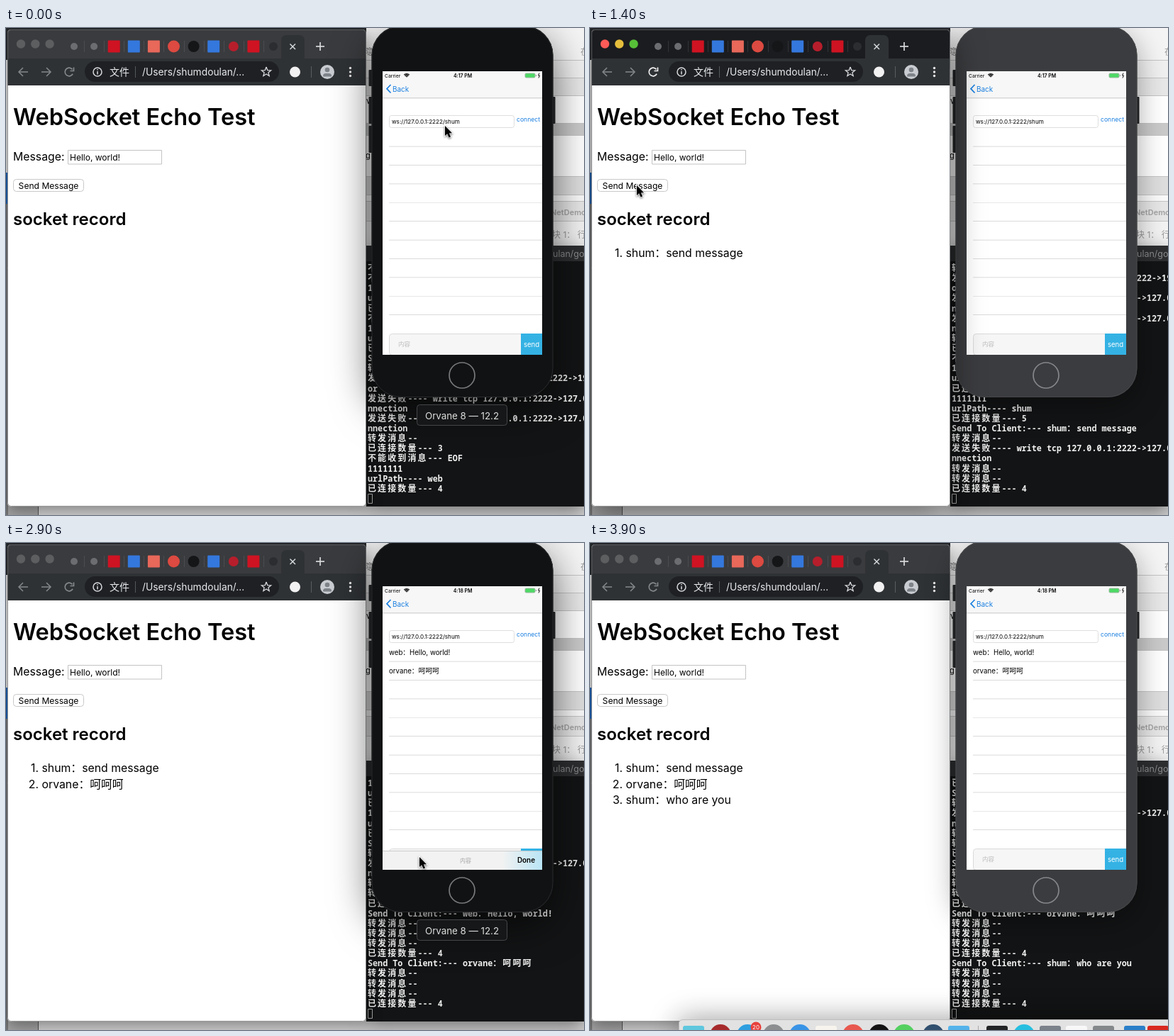
Animation, 815 px wide and 687 px high, one loop 4000 ms. Source, as an HTML page with a canvas:

```html
<!DOCTYPE html>
<html lang="zh-CN">
<head>
<meta charset="utf-8">
<title>WebSocket Echo Test</title>
<style>
html, body { margin: 0; width: 100%; height: 100%; overflow: hidden; background: #d4d4d4; }
canvas { display: block; }
</style>
</head>
<body>
<canvas id="stage" width="815" height="687"></canvas>
<script>
const g = document.getElementById('stage').getContext('2d');
const SANS = 'Inter, "Noto Sans CJK SC", "Noto Sans CJK", sans-serif';
const MONO = '"Noto Sans Mono", "DejaVu Sans Mono", "Noto Sans CJK SC", "Noto Sans CJK", monospace';
const LOOP = 4000, STEP = 100, BLUE = '#1a7fe0';

// ---- drawing helpers ----
function rect(x, y, w, h, fill, radius = 0, stroke) {
  g.beginPath();
  g.roundRect(x, y, w, h, radius);
  if (fill) { g.fillStyle = fill; g.fill(); }
  if (stroke) { g.strokeStyle = stroke; g.lineWidth = 1; g.stroke(); }
}
function disc(x, y, r, fill) {
  g.beginPath();
  g.arc(x, y, r, 0, 7);
  g.fillStyle = fill;
  g.fill();
}
function path(points, color, width = 1.5) {
  g.beginPath();
  points.forEach(([x, y]) => g.lineTo(x, y));
  g.strokeStyle = color;
  g.lineWidth = width;
  g.stroke();
}
function arc(x, y, r, from, to, color, width = 1.5) {
  g.beginPath();
  g.arc(x, y, r, from, to);
  g.strokeStyle = color;
  g.lineWidth = width;
  g.stroke();
}
function text(s, x, y, size, color = '#000', weight = 400, align = 'left', family = SANS) {
  g.font = `${weight} ${size}px ${family}`;
  g.fillStyle = color;
  g.textAlign = align;
  g.fillText(s, x, y);
}
function shadowed(blur, dy, alpha, draw) {
  g.save();
  g.shadowBlur = blur;
  g.shadowOffsetY = dy;
  g.shadowColor = `rgba(0,0,0,${alpha})`;
  draw();
  g.restore();
}
function clipped(x, y, w, h, draw) {
  g.save();
  g.beginPath();
  g.rect(x, y, w, h);
  g.clip();
  draw();
  g.restore();
}

// ---- timeline: keys are [time, ...values], linear in between ----
function track(keys, t) {
  const i = keys.findIndex(k => k[0] > t);
  if (i < 0) return keys.at(-1).slice(1);
  if (i === 0) return keys[0].slice(1);
  const a = keys[i - 1], b = keys[i], p = (t - a[0]) / (b[0] - a[0]);
  return a.slice(1).map((v, n) => v + (b[n + 1] - v) * p);
}
const CURSOR = [[0, 619, 138], [300, 737, 124], [400, 737, 124], [600, 600, 438], [700, 600, 438],
  [800, 580, 378], [900, 580, 378], [1000, 742, 402], [1100, 742, 410], [1300, 93, 202],
  [1400, 66, 222], [1500, 66, 224], [2100, 66, 224], [2500, 560, 440], [2700, 583, 443],
  [3000, 583, 443], [3200, 745, 405], [3300, 750, 425], [3400, 750, 425], [3700, 640, 690]];
const LIFT = [[800, 0], [900, 36], [1000, 36], [1100, 2], [1200, 0], [2900, 0], [3000, 36], [3200, 36], [3300, 2], [3400, 0]];
const BAR = [[700, 0], [800, 26.5], [1000, 26.5], [1100, 2], [1200, 0], [2800, 0], [2900, 26.5], [3200, 26.5], [3300, 2], [3400, 0]];
const DOCK = [[3600, 687], [3900, 672]];

const RECORDS = [[1100, 'shum：send message'], [2500, 'orvane：呵呵呵'], [3300, 'shum：who are you']];
const ROWS = [[2000, 'web：Hello, world!'], [2500, 'orvane：呵呵呵']];
const DRAFTS = [[900, 1000, 'send message'], [3000, 3200, 'who are you']];

// ---- terminal log ----
const count = n => '已连接数量--- ' + n;
const join = (who, n) => ['1111111', 'urlPath---- ' + who, count(n)];
const relay = '转发消息--', eof = '不能收到消息--- EOF';
const failed = (ip = '127.0.0.1', rest = 'nnection') => [`发送失败---- write tcp ${ip}:2222->${ip}`, rest];
const sent = s => ['Send To Client:--- ' + s, relay, relay, relay, count(4)];
const LOG = [
  [0, [eof, eof, ...join('web', 3), eof, ...join('web', 4), 'Send To Client:--- web', relay,
    ...failed('192.168.1.19', 'or'), ...failed(), ...failed(), relay, count(3), eof, ...join('web', 4)]],
  [400, join('shum', 5)],
  [1100, ['Send To Client:--- shum：send message', relay, ...failed(), relay, relay, count(4)]],
  [2000, sent('web：Hello, world!')],
  [2500, sent('orvane：呵呵呵')],
  [3300, sent('shum：who are you')]
];
function terminalLine(s, y) {
  let x = 510;
  for (const ch of s) {
    const wide = ch > '\u2fff';
    text(ch, x, y, wide ? 12 : 11.7, '#f2f2f2', 600, 'left', MONO);
    x += wide ? 14.1 : 7.05;
  }
}
function terminal(t) {
  shadowed(24, 8, .45, () => rect(508, 307, 307, 368, '#131415'));
  rect(508, 307, 307, 22, '#2c2e30');
  text('ulan/go', 771, 323, 12.5, '#898b8c');
  clipped(508, 329, 307, 346, () => {
    const lines = LOG.filter(e => e[0] <= t).flatMap(e => e[1]).slice(-23);
    lines.forEach((s, i) => terminalLine(s, 343 + i * 14.13));
  });
  rect(510.5, 657.5, 6, 13, null, 0, '#a5a5a5');
}

function desktop() {
  rect(0, 0, 815, 687, '#d6d6d6');
  rect(0, 0, 508, 45, '#25282b');
  rect(0, 45, 3, 159, '#e4e4e4');
  rect(0, 204, 3, 44, '#1e62b5');
  rect(0, 248, 3, 439, '#777');
  rect(3, 672, 43, 15, '#a5a5a5');
  rect(45, 675, 1, 12, '#555');
  rect(508, 0, 307, 307, '#f4f4f4');
  for (const [y, h, color] of [[45, 25, '#f0f0f0'], [70, 25, '#e8e8e8'], [95, 39, '#fff'], [134, 17, '#cacaca'],
    [151, 58, '#fff'], [209, 26, '#dedede'], [235, 9, '#fafafa'], [244, 28, '#e7e7e7'], [272, 35, '#f3f3f3']]) {
    rect(508, y, 307, h, color);
    rect(508, y, 307, 1, '#c4c4c4');
  }
  text('在', 810, 38, 12, '#999');
  text('隐', 506, 38, 12, '#777');
  text('v', 508, 107, 11);
  text('g', 507, 184, 11);
  text('NetDemo', 768, 264, 11, '#a2a2a2', 600);
  text('块 1： 行', 770, 296, 12, '#999');
}

// ---- browser ----
function favicons() {
  const icons = [['#6b6d70', 5, 1], ['#6b6d70', 5, 1], ['#cf1322', 8.5], ['#3478dd', 8.5], ['#e8685a', 8.5],
    ['#dc4a41', 8.5, 1], ['#141618', 8, 1], ['#3478dd', 8.5], ['#b71e2c', 7, 1], ['#cf1322', 8.5], ['#2b2d30', 6, 1]];
  icons.forEach(([color, r, round], i) => {
    const x = 96 + i * 28.1;
    if (round) disc(x, 26, r, color);
    else rect(x - r, 26 - r, 2 * r, 2 * r, color, 1);
    if (i < 10) rect(Math.round(x + 14), 18, 1, 16, 'rgba(140,145,150,.2)');
  });
}
function browser(t, active) {
  shadowed(active ? 46 : 22, active ? 12 : 6, active ? .55 : .4, () => rect(2, 2, 505.5, 673, '#fff', 5));
  rect(2, 2, 505.5, 60, active ? '#1b1c1f' : '#3a3b3e', 5);
  rect(388, 10, 33, 40, '#2f3235', [7, 7, 0, 0]);
  rect(2, 43, 505.5, 38, '#2f3235');
  ['#fc5b57', '#e5bf3c', '#57c038'].forEach((c, i) => disc(21 + 20.3 * i, 22.5, 6.2, active ? c : '#5c5e60'));
  favicons();
  const light = '#d7d9db', dim = '#85888b';
  path([[400.5, 22.5], [408, 30]], light);
  path([[408, 22.5], [400.5, 30]], light);
  path([[437, 26], [449, 26]], light, 1.7);
  path([[443, 20], [443, 32]], light, 1.7);

  path([[31, 62], [18, 62]], dim);
  path([[24, 56], [18, 62], [24, 68]], dim);
  path([[50, 62], [63, 62]], dim);
  path([[57, 56], [63, 62], [57, 68]], dim);
  const reload = active ? '#f0f0f0' : dim;
  arc(89, 62, 5.8, .5, 5.6, reload, 1.7);
  path([[95.5, 55.5], [95.5, 60.5], [90.5, 60.5]], reload, 1.7);
  rect(111, 47, 274, 29, '#1e2023', 14.5);
  arc(129, 62, 6, 0, 7, light);
  path([[129, 61], [129, 65.5]], light);
  path([[129, 58], [129, 59.6]], light);
  text('文件', 146, 67, 14, '#e8eaec');
  rect(182, 54, 1, 16, '#55585b');
  text('/Users/shumdoulan/...', 192, 67, 13.8, '#e8eaec');
  const star = Array.from({ length: 11 }, (_, i) => {
    const r = i % 2 ? 3 : 7, a = i * Math.PI / 5 - Math.PI / 2;
    return [367 + r * Math.cos(a), 62 + r * Math.sin(a)];
  });
  path(star, light, 1.3);
  disc(407.5, 62, 7.5, '#f2f2f2');
  rect(430, 54, 1, 16, '#5a5d60');
  disc(453, 62, 10, '#c9ccd1');
  disc(453, 59, 3.3, '#7e838a');
  rect(447, 64, 12, 4.5, '#7e838a', [5, 5, 1, 1]);
  [56.5, 62, 67.5].forEach(y => disc(485.5, y, 1.7, '#e6e6e6'));

  text('WebSocket Echo Test', 10, 136.5, 32.5, '#000', 600);
  text('Message:', 10, 187, 15.8);
  rect(87.5, 172.5, 132, 19.5, '#fff', 0, '#c3c3c3');
  text('Hello, world!', 90, 187, 12);
  rect(10.5, 213.5, 99, 17, '#fff', 4, '#c8c8c8');
  text('Send Message', 60, 226.5, 12.1, '#000', 400, 'center');
  text('socket record', 10, 278, 24, '#000', 600);
  RECORDS.forEach(([at, s], i) => {
    if (t < at) return;
    const y = 323.3 + i * 22.3;
    text(i + 1 + '.', 46, y, 15.8, '#000', 400, 'right');
    text(s, 50.5, y, 15.8);
  });
  rect(2.5, 2.5, 505, 672, null, 5, 'rgba(110,112,114,.7)');
}

// ---- phone ----
function statusBar(t) {
  rect(531, 61, 225, 38, '#f7f7f7');
  rect(531, 98.5, 225, .8, '#b8b8b8');
  text('Carrier', 534, 69.5, 6.8);
  for (const r of [1.6, 3.6, 5.4]) arc(565, 70, r, -2.35, -.8, '#000', 1.3);
  text(t < 2400 ? '4:17 PM' : '4:18 PM', 644, 69.5, 6.9, '#000', 600, 'center');
  rect(732, 64, 14, 6, '#4cd964', 1.5, '#9fb5a2');
  rect(747, 66, 1, 2, '#999');
  path([[752, 63.5], [750.5, 67], [752.5, 67], [751, 70.5]], '#000', .9);
  path([[542.5, 80], [537, 85.7], [542.5, 91.5]], BLUE, 1.7);
  text('Back', 545, 89.7, 9.9, BLUE);
}
function screenContent(t) {
  const [lift] = track(LIFT, t), [bar] = track(BAR, t);
  g.save();
  g.translate(0, -lift);
  rect(540.5, 123.5, 176, 17, '#fff', 3, '#dedede');
  text('ws://127.0.0.1:2222/shum', 544, 134.8, 8.1);
  text('connect', 720, 132, 8.6, BLUE);
  for (let i = 0; i < 10; i++) rect(540, 166.7 + i * 26.4, 216, .7, '#cfcfcf');
  ROWS.forEach(([at, s], i) => { if (t >= at) text(s, 540, 157.5 + i * 26.4, 9.7); });
  rect(540.5, 431.5, 190, 30, '#f6f6f6', 4, '#dadada');
  rect(726, 431, 30, 30, '#34b2e4');
  text('send', 741, 449.5, 9.6, '#fff', 400, 'center');
  const draft = DRAFTS.find(([from, to]) => t >= from && t < to + STEP);
  if (draft) {
    const [from, to, s] = draft;
    text(s.slice(0, Math.ceil(s.length * (t - from + STEP) / (to - from + STEP))), 553, 449, 8.6);
  } else text('内容', 553, 449, 8.5, '#bcbcbc');
  g.restore();

  if (bar > 0) {
    const y = 460.5 - bar, tint = g.createLinearGradient(700, 0, 756, 0);
    tint.addColorStop(0, '#f2f2f2');
    tint.addColorStop(1, '#b9e4f5');
    rect(531, y, 225, 28, tint);
    rect(531, y, 225, .8, '#bdbdbd');
    text('内容', 648, y + 17, 8, '#a5a5a5', 400, 'center');
    text('Done', 746, y + 17, 9.9, '#000', 600, 'right');
  }
  if ((t >= 1100 && t < 1200) || (t >= 3300 && t < 3500)) {
    rect(617.5, 249, 51.5, 23.5, '#25282a', 5);
    text('发送成功', 643.2, 264.2, 9.7, '#fff', 400, 'center');
  }
}
function phone(t, active, labelled) {
  const body = active ? '#111213' : '#3b3c3f';
  for (const [x, y, h] of [[511.5, 59, 23], [511.5, 97, 38], [511.5, 138, 38], [769, 97, 38]]) rect(x, y, 5.5, h, '#242628', 1);
  shadowed(active ? 56 : 40, active ? 18 : 12, active ? .6 : .36, () => rect(515.5, -3, 256, 524, body, 41));
  rect(516, -2.5, 255, 523, null, 41, active ? '#2a2b2d' : '#47484a');
  arc(643, 490, 18, 0, 7, active ? '#77797b' : '#85878a', 1.7);
  rect(531, 61, 225, 400, '#fff');
  clipped(531, 99, 225, 362, () => screenContent(t));
  statusBar(t);
  if (labelled) {
    rect(579.5, 531.5, 127, 29, '#161718', 4, '#454648');
    text('Orvane 8 — 12.2', 643, 551.5, 13.3, '#dedede', 400, 'center');
  }
}

// ---- dock and pointer ----
function dock(top) {
  shadowed(40, 0, .4, () => rect(125.5, top + .5, 720, 40, '#e4e4e4', 5, '#bdbdbd'));
  const icons = [[146, '#5fc7de'], [184, '#a62a2c', 1], [222, '#2f9fe0', 1], [259, '#8c8e90', 1], [296, '#3a94e6', 1],
    [333, '#f7f4ee'], [371, '#e8584e', 1], [408, '#141414', 1], [443, '#53d060', 1], [484, '#32506f', 1],
    [520, '#55b3ea'], [574, '#222426'], [612, '#27bfe0', 1], [649, '#7b828a'], [686, '#f8f8f8'],
    [724, '#85888a'], [768, '#2a7fc9'], [801, '#d9281f']];
  for (const [x, color, round] of icons) {
    if (round) disc(x, top + 22, 15, color);
    else rect(x - 15, top + 9, 30, 30, color, 3);
  }
  rect(547, top + 9, 1, 20, '#aaa');
  disc(234, top + 11, 7.5, '#e8413c');
  text('20', 234, top + 14, 8, '#fff', 400, 'center');
}
function pointer(x, y) {
  g.save();
  g.translate(x, y);
  shadowed(3, 1, .4, () => {
    g.beginPath();
    for (const [px, py] of [[0, 0], [0, 14], [3.2, 11], [5.6, 16.4], [8, 15.4], [5.7, 10.2], [10, 10.2]]) g.lineTo(px, py);
    g.closePath();
    g.strokeStyle = '#fff';
    g.lineWidth = 2;
    g.stroke();
    g.fillStyle = '#000';
    g.fill();
  });
  g.restore();
}

function render(t) {
  const [x, y] = track(CURSOR, t);
  const browserActive = t >= 1400 && t < 2900;
  const phoneActive = !browserActive && t < 3800;
  const hovering = x > 516 && x < 771 && y < 520;
  const layers = [() => browser(t, browserActive), () => phone(t, phoneActive, phoneActive || hovering)];
  if (browserActive) layers.reverse();
  desktop();
  terminal(t);
  layers.forEach(draw => draw());
  const [top] = track(DOCK, t);
  if (top < 687) dock(top);
  pointer(x, y);
}
function tick() {
  render(Math.floor(performance.now() % LOOP / STEP) * STEP);
  requestAnimationFrame(tick);
}
tick();
</script>
</body>
</html>
```
